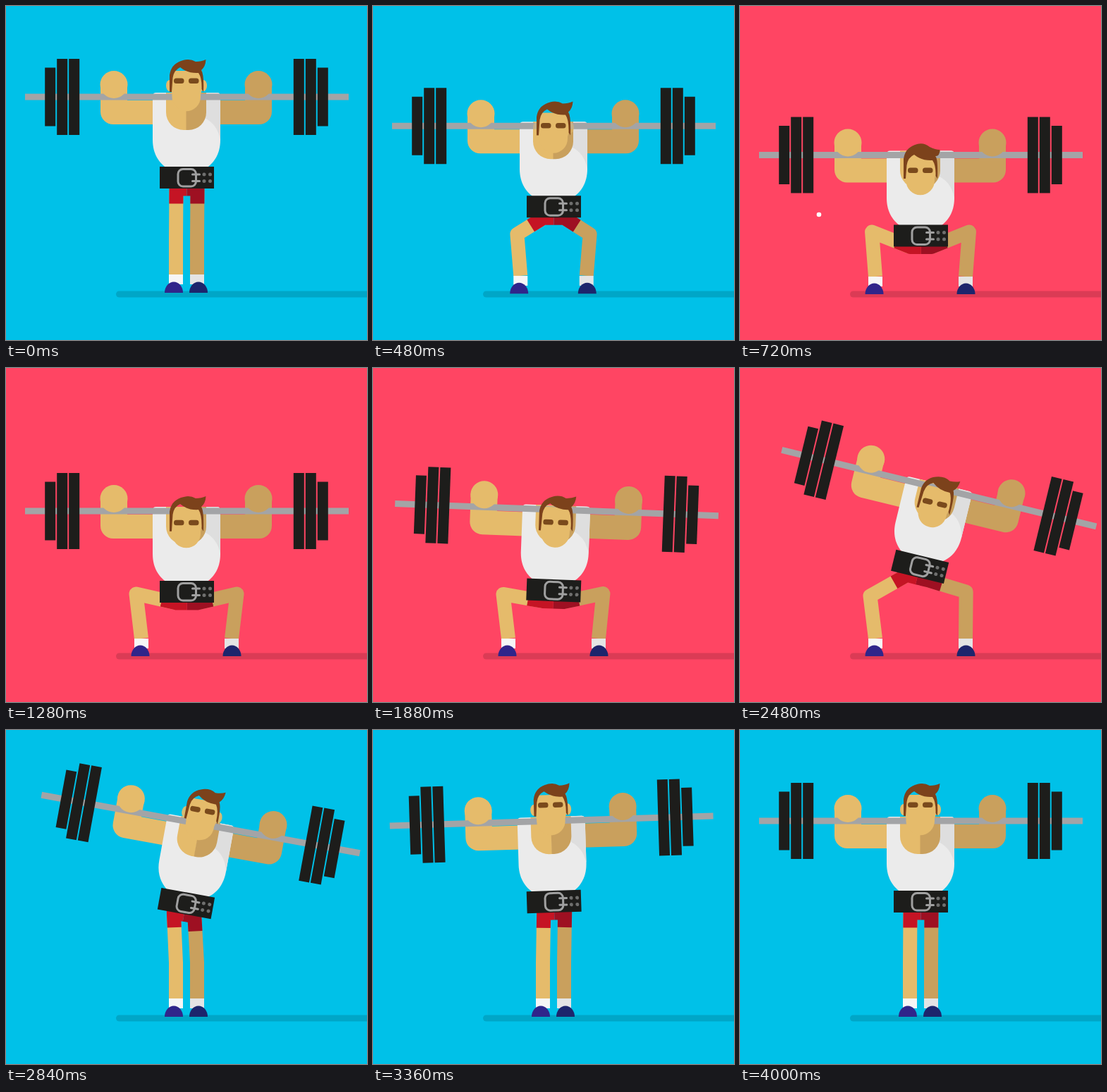
Recreate the animation shown at these times as an HTML page. Size 512 px wide and 474 px high, loop 4.04 s.

```html
<!DOCTYPE html>
<html lang="en">
<head>
<meta charset="utf-8">
<title>Weightlifter</title>
<style>
  html, body { margin: 0; width: 100%; height: 100%; overflow: hidden; background: #00c1e8; }
  svg { display: block; width: 100vw; height: 100vh; }
  .light { fill: #e5bb6b; }
  .dark { fill: #c9a05d; }
  .black { fill: #1d1d1b; }
  .limb { fill: none; stroke-width: 20; stroke-linejoin: round; }
</style>
</head>
<body>
<svg viewBox="0 0 512 474" preserveAspectRatio="none">
  <rect id="bg" width="512" height="474" fill="#00c1e8"/>
  <path d="M160.500 409H520" stroke="#000" stroke-opacity=".14" stroke-width="9" stroke-linecap="round"/>

  <g id="legs"></g>

  <g id="torso">
    <path class="light" d="M134 111V150a18 18 0 0 0 18 18H212V134H172V111z"/>
    <path class="dark" d="M377 111V150a18 18 0 0 1-18 18H300V134H339V111z"/>
    <path fill="#ebebeb" d="M213 123H299q5 0 5 5V190C304 212 293 224 284 230H228C219 224 208 212 208 190V128q0-5 5-5z"/>
    <path fill="#dedede" d="M284 123H299q5 0 5 5V190Q300 168 282 159z"/>
    <path class="light" d="M227 123H256V176H252a25 25 0 0 1-25-25z"/>
    <path class="dark" d="M284 123H255.500V176H259a25 25 0 0 0 25-25z"/>
    <path fill="#a3a4a6" d="M27 124.500H486V133.500H27z"/>
    <g id="plates" class="black"></g>
    <circle class="light" cx="153" cy="111.500" r="19.500"/>
    <circle class="dark" cx="358" cy="111.500" r="19.500"/>

    <g id="head">
      <g id="ears">
        <ellipse class="light" cx="232" cy="113" rx="5" ry="8"/>
        <ellipse class="light" cx="280" cy="113" rx="5" ry="8"/>
      </g>
      <path class="light" d="M234 92H278V118L276 126V129a20.250 20.250 0 0 1-40.500 0V126L234 118z"/>
      <path id="hair" fill="#7c421b"/>
      <g id="eyes" fill="#7a4a1c">
        <rect x="238" y="102.500" width="14.500" height="7.500" rx="3.500"/>
        <rect x="259" y="102.500" width="14.500" height="7.500" rx="3.500"/>
      </g>
    </g>

    <path class="black" d="M218 228H295V259H218z"/>
    <rect x="244" y="231.500" width="25.500" height="24.500" rx="7" fill="none" stroke="#a0a0a0" stroke-width="3"/>
    <path d="M264.500 239H274.500M264.500 248.500H274.500" stroke="#a0a0a0" stroke-width="3" stroke-linecap="round"/>
    <path d="M281 239h0M289.500 239h0M281 248.500h0M289.500 248.500h0" stroke="#6f6f6e" stroke-width="5" stroke-linecap="round"/>
  </g>

  <circle id="sweat" r="3.300" fill="#fff"/>
</svg>

<script>
const LOOP = 4040, STEP = 40;
const PIVOT = { x: 256.5, y: 243.5 };
const $ = id => document.getElementById(id);
const lerp = (a, b, k) => a + (b - a) * k;
const part = (t, a, b) => Math.min(1, Math.max(0, (t - a) / (b - a)));
const set = (el, attrs) => { for (const k in attrs) el.setAttribute(k, attrs[k]); };

// Eased 0 to 1, and eased 0 to 1 to 0, between two times.
const ramp = (t, a, b) => { const k = part(t, a, b); return k * k * (3 - 2 * k); };
const bump = (t, a, b) => Math.sin(Math.PI * part(t, a, b)) ** 2;

function add(parent, tag, attrs) {
  const el = document.createElementNS('http://www.w3.org/2000/svg', tag);
  set(el, attrs);
  return parent.appendChild(el);
}

function pose(t) {
  const down = ramp(t, 360, 600) - ramp(t, 2640, 2880);
  const brace = ramp(t, 900, 1240);
  const lift = ramp(t, 1760, 2640);
  const lean = ramp(t, 1640, 2640) - ramp(t, 2660, 3160);
  return {
    sink: down * (82.5 - 8.5 * brace - 39 * lift),
    tilt: 14.7 * lean - 1.9 * bump(t, 2900, 3680),
    spread: ramp(t, 360, 560) - ramp(t, 2640, 2840),
    bow: down * (1 - .12 * (brace - ramp(t, 1560, 2440))),
    droop: bump(t, 560, 880)
  };
}

for (const side of [-1, 1]) {
  for (let i = 0; i < 3; i++) {
    const half = i < 2 ? 54 : 41.5;
    add($('plates'), 'rect', {
      x: 248.5 + side * (159.3 + 17 * i), y: 129 - half, width: 15, height: 2 * half
    });
  }
}

function makeLeg(side, skin, shorts, sock, shoe) {
  const line = stroke => add($('legs'), 'path', { class: 'limb', stroke });
  return {
    side, skin: line(skin), sock: line(sock), shorts: line(shorts),
    shoe: add($('legs'), 'path', { d: 'M-13 0A13 15.500 0 0 1 13 0z', fill: shoe })
  };
}
const legs = [
  makeLeg(1, '#c9a05d', '#9e1022', '#e4e4e4', '#1d256c'),
  makeLeg(-1, '#e5bb6b', '#c51424', '#f6f6f6', '#30258a')
];

function drawLeg(leg, { sink, tilt, spread }, x) {
  const { side } = leg, rad = tilt * Math.PI / 180, c = Math.cos(rad), n = Math.sin(rad);
  const turn = (dx, dy) => [PIVOT.x + x + dx * c - dy * n, PIVOT.y + sink + dx * n + dy * c];
  const crotch = turn(0, 16), hip = turn(side * 15, 16);
  const squeeze = Math.max(0, sink - 74) * .3;
  const knee = [
    256 + side * (lerp(15, 71.5 - squeeze, spread)) - Math.max(0, side * tilt) * .5 * spread,
    lerp(330, 320.5, spread) - side * tilt * .22 * spread
  ];
  const ankle = [256 + side * lerp(15, 64, spread), lerp(381, 384, spread)];
  const shoeX = 255.5 + side * lerp(17.5, 65, spread);
  const dx = knee[0] - hip[0], dy = knee[1] - hip[1], k = 21 / Math.hypot(dx, dy);
  const hem = [hip[0] + dx * k, hip[1] + dy * k];
  set(leg.skin, { d: `M${hip}L${knee}L${ankle}` });
  set(leg.shorts, { d: `M${crotch}L${hip}L${hem}` });
  set(leg.sock, { d: `M${ankle}l0 14` });
  set(leg.shoe, { transform: `translate(${shoeX} ${lerp(407, 409, spread)})` });
}

function drawHead({ bow, droop }) {
  const tip = 76 + 9 * droop, fringe = 5 * droop, burn = 122 + 4 * bow;
  set($('head'), { transform: `translate(0 ${36.5 * bow})` });
  set($('eyes'), { transform: `translate(0 ${8 * bow})` });
  set($('ears'), { opacity: 1 - bow });
  set($('hair'), { d: `M232 ${burn}V98Q234 83 248 78Q260 73.500 269 ${79 + droop * 2}
    Q277 ${79 + droop * 6} 283.500 ${tip}Q283 ${tip + 10} 277 ${91 + droop * 3}Q281 97 280 ${burn}
    L277.500 ${burn - 4}Q278 ${102 + fringe} 273 ${95 + fringe}Q258 ${96 + fringe} 247 ${87 + fringe}
    Q238 ${91 + fringe} 236.500 ${102 + fringe}L235 ${burn}z` });
}

function drawSweat(t) {
  const k = (t - 560) / 160;
  const x = 226 - 114 * k, y = 215 - 40 * k + 121 * k * k;
  set($('sweat'), { cx: x, cy: y, visibility: k >= 0 && y < 405 ? 'visible' : 'hidden' });
}

function draw(t) {
  const p = pose(t), x = -.1 * p.tilt;
  set($('bg'), { fill: t >= 520 && t < 2720 ? '#ff4563' : '#00c1e8' });
  set($('torso'), { transform: `translate(${x} ${p.sink}) rotate(${p.tilt} ${PIVOT.x} ${PIVOT.y})` });
  legs.forEach(leg => drawLeg(leg, p, x));
  drawHead(p);
  drawSweat(t);
}

const start = performance.now();
function tick() {
  const t = (performance.now() - start) % LOOP;
  draw(Math.floor(t / STEP) * STEP);
  requestAnimationFrame(tick);
}
tick();
</script>
</body>
</html>
```
